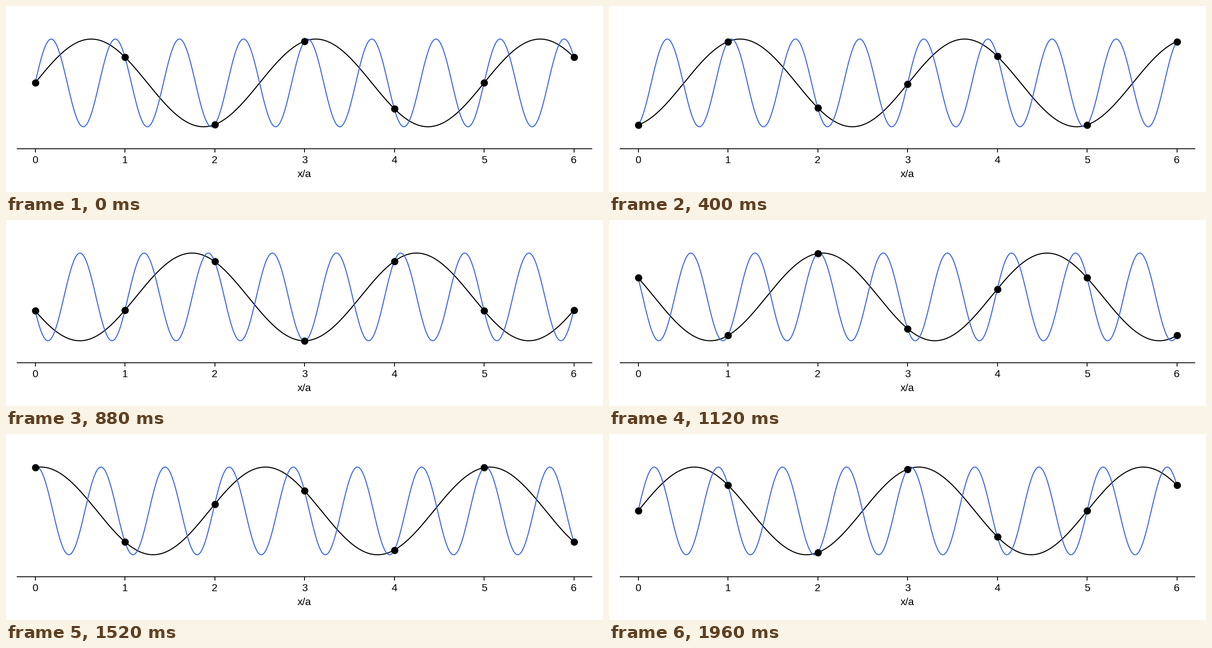
A matplotlib script for the animation above (2 s loop, 1280 by 400 pixels).

```python
import numpy as np
import matplotlib.pyplot as plt
from matplotlib.animation import FuncAnimation

plt.rcParams["font.family"] = "Liberation Sans"

FRAMES = 50
W, H, DPI = 1280, 400, 160
LONG, SHORT = 0.4, 1.4  # cycles per lattice spacing; equal on whole numbers

fig = plt.figure(figsize=(W / DPI, H / DPI), dpi=DPI, facecolor="white")
ax = fig.add_axes([24 / W, 93.2 / H, 1232 / W, 282.8 / H])
ax.set_xlim(-0.2, 6.2)
ax.set_ylim(-1.5, 1.5)
ax.set_xticks(range(7))
ax.set_yticks([])
ax.set_xlabel("x/a")
for side in ("left", "right", "top"):
    ax.spines[side].set_visible(False)

x = np.linspace(0, 6, 1000)
sites = np.arange(7)


def wave(pos, freq, phase):
    return np.sin(2 * np.pi * freq * pos - phase)


slow, = ax.plot(x, wave(x, LONG, 0), color="black", lw=1)
fast, = ax.plot(x, wave(x, SHORT, 0), color="royalblue", lw=1)
atoms, = ax.plot(sites, wave(sites, LONG, 0), "o", color="black", ms=6)


def update(i):
    # the last frame completes the cycle, so it equals the first
    phase = 2 * np.pi * i / (FRAMES - 1)
    slow.set_ydata(wave(x, LONG, phase))
    fast.set_ydata(wave(x, SHORT, phase))
    atoms.set_ydata(wave(sites, LONG, phase))
    return slow, fast, atoms


anim = FuncAnimation(fig, update, frames=FRAMES, interval=40, repeat=True)
plt.show()
```
